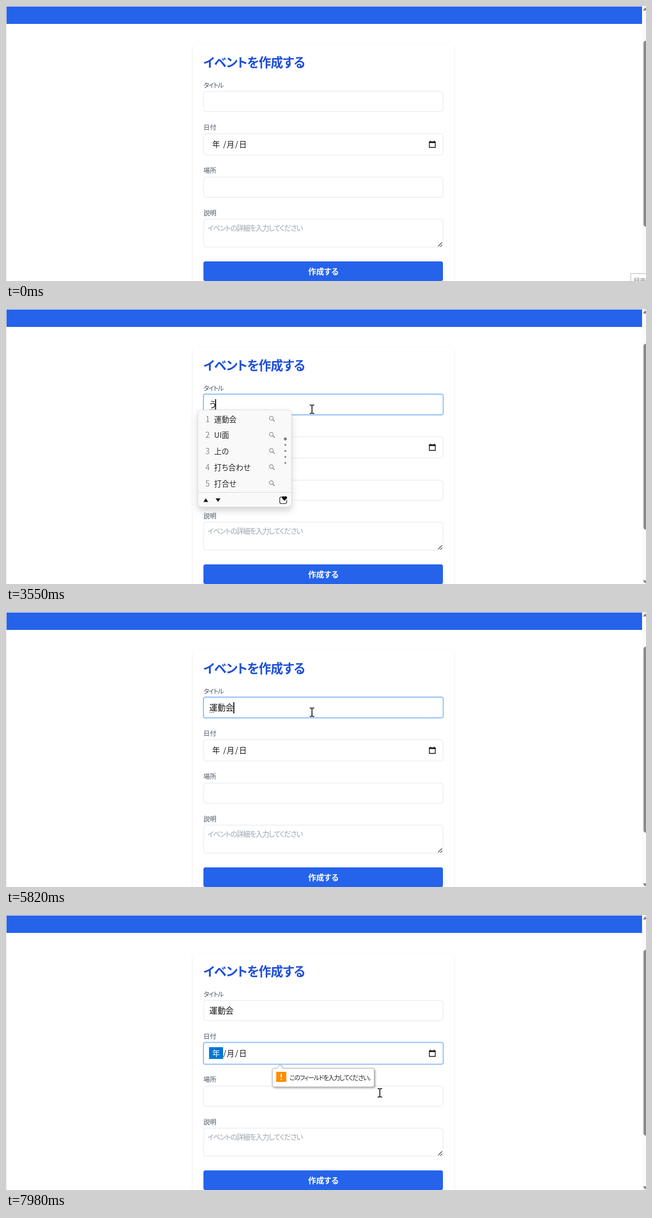
Animation of 1141 by 491 pixels, one loop 8000 ms. Source, as an HTML page:

```html
<!DOCTYPE html>
<html lang="ja">
<head>
<meta charset="utf-8">
<title>イベントを作成する</title>
<style>
  html, body { margin: 0; width: 100%; height: 100%; overflow: hidden; background: #fff; }
  svg { display: block; width: 1141px; height: 491px; }
  text { font-family: "Noto Sans CJK JP", "Noto Sans CJK", "Noto Sans", sans-serif; font-feature-settings: "palt"; white-space: pre; }
  .heading { font-size: 22.2px; font-weight: 700; letter-spacing: -.03em; fill: #1d4ed8; }
  .label { font-size: 11.5px; fill: #4b5563; }
  .kana { letter-spacing: -.1em; }
  .value { font-size: 14.4px; fill: #111; }
  .date { font-size: 13.6px; fill: #111; }
  .placeholder { font-size: 12.8px; letter-spacing: -.09em; fill: #9ca3af; }
  .message { font-size: 11.2px; letter-spacing: -.11em; fill: #222; }
  .field { fill: #fff; stroke: #e5e7eb; stroke-width: 1; }
  .field.focus { stroke: #93c0f5; stroke-width: 2; }
  .card { fill: #fff; filter: drop-shadow(0 2px 2px rgba(0,0,0,.09)); }
  .panel { fill: #f9f9f9; stroke: #dedede; filter: drop-shadow(0 6px 6px rgba(0,0,0,.17)); }
  .bubble { fill: #fff; stroke: #a3a3a3; filter: drop-shadow(2px 2px 1.5px rgba(0,0,0,.28)); }
</style>
</head>
<body>
<svg viewBox="0 0 1141 491">
  <rect width="1141" height="491" fill="#fff"/>
  <rect class="card" x="333" y="68" width="465.5" height="470" rx="7"/>
  <path d="M0.5 0V491M0 .5H1141" stroke="#e3e3e6"/>
  <rect x="1" y="1" width="1133" height="31" fill="#2563eb"/>

  <rect x="1134" y="1" width="7" height="490" fill="#fbfbfb"/>
  <rect x="1136.5" y="62" width="9" height="332" rx="4.5" fill="#8a8a8a"/>
  <path d="M1135.5 8L1139.5 2.5L1143.5 8Z" fill="#808080"/>
  <path id="downArrow" d="M1135.5 484.5L1139.5 490L1143.5 484.5Z" fill="#808080"/>
  <g id="hint">
    <rect x="1113.7" y="477.7" width="40" height="30" fill="#fff" stroke="#c9c9cc" stroke-width="1.4"/>
    <text x="1119" y="494.5" font-size="11" fill="#888">録画</text>
  </g>

  <text class="heading" x="352" y="108.7">イベントを作成する</text>
  <text class="label kana" x="352" y="145.7">タイトル</text>
  <text class="label" x="352" y="221">日付</text>
  <text class="label" x="352" y="298">場所</text>
  <text class="label" x="352" y="374">説明</text>
  <rect class="field" id="titleBox" rx="3.5"/>
  <rect class="field" id="dateBox" rx="3.5"/>
  <rect class="field" x="352.5" y="305.5" width="426.5" height="36" rx="3.5"/>
  <rect class="field" x="352.5" y="380.5" width="426.5" height="50" rx="3.5"/>
  <text class="placeholder" x="359" y="400.5">イベントの詳細を入力してください</text>
  <path d="M770.5 429L777.5 422M774.5 429.5L777.5 426.5" stroke="#444" stroke-width="1.1"/>

  <rect id="yearMark" x="362" y="236" width="25" height="21" fill="#0078d7"/>
  <text class="date" id="year" x="367.7" y="252">年</text>
  <text class="date" x="387.2" y="252">/</text>
  <text class="date" x="393.5" y="252">月</text>
  <text class="date" x="408.5" y="252">/</text>
  <text class="date" x="415.5" y="252">日</text>
  <path d="M756.7 240.5v2M763.3 240.5v2M754.7 242.5h10.6v10h-10.6Z" fill="none" stroke="#111" stroke-width="1.3"/>
  <path d="M754.7 242h10.6v2.6h-10.6Z" fill="#111"/>

  <rect id="button" x="352" y="456" width="427" height="35" rx="3.5"/>
  <text x="565.8" y="478.5" font-size="14.2" font-weight="700" fill="#fff" text-anchor="middle">作成する</text>

  <text class="value" id="typed" x="362.5" y="176"></text>
  <path id="underline" stroke="#222"/>
  <rect id="caret" y="161" width="1.7" height="20" fill="#000"/>

  <g id="popup">
    <rect class="panel" id="panel" x="342" y="180" height="173.5" rx="7"/>
    <path id="divider" stroke="#dcdcdc"/>
    <g id="rows"></g>
    <path d="M352 344.5l4.2-6.5l4.2 6.5ZM373.7 338h8.6l-4.3 6.5Z" fill="#111"/>
    <g id="popupEnd">
      <circle cx="-11" cy="232" r="2.7" fill="#808080"/>
      <g id="dots" fill="#808080"></g>
      <path d="M-14 335.5h-4a3 3 0 0 0-3 3v6a3 3 0 0 0 3 3h6.5a3 3 0 0 0 3-3v-3" fill="none" stroke="#222" stroke-width="1.2"/>
      <path d="M-12.5 342.5l-4-4a2.5 2.5 0 0 1 4-3.2a2.5 2.5 0 0 1 4 3.2Z" fill="#111"/>
    </g>
  </g>

  <g id="tip">
    <path class="bubble" d="M478 273.5h5l5.5-6.500l5.5 6.500H653.5a3 3 0 0 1 3 3v27.500a3 3 0 0 1-3 3H477.5a3 3 0 0 1-3-3v-27.500a3 3 0 0 1 3-3Z"/>
    <rect x="481.7" y="280" width="18" height="18" fill="#ff8c00"/>
    <path d="M490.7 283.5v6.5M490.7 292.5v2.3" stroke="#fff" stroke-width="2.2"/>
    <text class="message" x="505.5" y="294.5">このフィールドを入力してください。</text>
  </g>

  <g id="cursor" stroke-linejoin="round">
    <path id="arrow" d="M.5.5V16.5L4.2 13L6.6 18.5L9 17.5L6.6 12.2H11.5Z" fill="#fff" stroke="#111"/>
    <path id="beam" d="M-4-7.5H-1.5L0-6.5L1.5-7.5H4M0-6.5V6.5M-4 7.5H-1.5L0 6.5L1.5 7.5H4" fill="none" stroke="#000" stroke-width="1.5"/>
    <path id="hand" d="M-1.8 1.3Q0-.8 1.5 1.3V6.2Q3 5.2 4.2 6.7Q6 6 7 7.5Q9.3 7.2 9.3 9.5V13Q9 16 7.5 18H-.5Q-1.5 16-2.5 14.8L-4.5 11.5Q-5.3 9-3.3 9.3L-1.8 10.8Z" fill="#fff" stroke="#111"/>
  </g>
</svg>
<script>
const LOOP = 8000;
const $ = id => document.getElementById(id);
const clamp = v => Math.max(0, Math.min(1, v));
const show = (id, on) => { $(id).style.display = on ? "" : "none"; };
const attrs = (el, values) => { for (const k in values) el.setAttribute(k, values[k]); };
const between = (t, a, b) => t >= a && t < b;
const stepAt = (track, t) => track.reduce((hit, step) => step[0] <= t ? step : hit, track[0]);

// time, text, popup width (0 = closed), suggestions
const typing = [
  [0, "", 0, ""],
  [3350, "う", 0, ""],
  [3480, "う", 167, "運動会 UI面 上の 打ち合わせ 打合せ"],
  [3680, "うn", 167, "運動会 UI面 上の 打ち合わせ 打合せ"],
  [3820, "うn", 161, "運動会 運動 うん 運用 運営"],
  [4350, "うん", 161, "運動会 うん 運用 運営 運転"],
  [4430, "うんd", 161, "運動会 運動 運動中 運動場 運動量"],
  [4520, "うんど", 161, "運動会 運動 運動中 運動場 運動量"],
  [4610, "うんどう", 161, "運動会 運動 運動習慣 運動公園 運動療法"],
  [5140, "うんどう k ", 161, "運動会 運動 運動習慣 運動公園 運動療法"],
  [5210, "うんどうか", 161, "運動会 運動か 運動会場 運動家 運動会の"],
  [5340, "うんどうかい", 186, "運動会 運動会の 運動会場 運動会は 運動会に"],
  [5480, "運動会", 0, ""]
];

// time and hotspot
const mouse = [
  [390, 1006, 365], [460, 915, 270], [530, 805, 160], [600, 690, 94], [670, 600, 108],
  [740, 550, 140], [810, 541, 192], [880, 590, 210], [950, 655, 203], [1020, 691, 195],
  [1550, 551, 191], [1750, 556, 235], [1820, -50, -50], [2010, 545.5, 179],
  [6560, 549, 235], [6630, 556, 358], [6700, 563, 457], [6770, 564, 463],
  [6910, 564, 468], [7050, 565, 472],
  [7640, 575, 461], [7710, 606, 415], [7780, 638, 365], [7850, 658, 332], [7920, 665, 320], [7980, 666.5, 317.5]
];

const rowY = i => 196.5 + i * 28.75;
for (let i = 0; i < 5; i++) {
  const y = rowY(i);
  $("rows").insertAdjacentHTML("beforeend",
    `<text x="355.5" y="${y + 5}" font-size="14" fill="#8a8a8a">${i + 1}</text>
     <text class="word" x="371" y="${y + 5}" font-size="13.4" fill="#222"></text>`);
  $("popupEnd").insertAdjacentHTML("beforeend",
    `<path d="M-33.5 ${y + 1}l3.5 3.5" stroke="#777" stroke-width="1.1"/>
     <circle cx="-36" cy="${y - 1.5}" r="3.5" fill="none" stroke="#777"/>`);
  if (i) $("dots").insertAdjacentHTML("beforeend", `<circle cx="-11" cy="${232 + i * 10.7}" r="1.7"/>`);
}
const words = [...document.querySelectorAll(".word")];

function drawField(id, focused, y, h) {
  const el = $(id);
  el.classList.toggle("focus", focused);
  attrs(el, focused
    ? { x: 352, y: y - .5, width: 427.5, height: h + 1 }
    : { x: 352.5, y, width: 426.5, height: h });
}

function drawTyping(t) {
  const [, text, width, list] = stepAt(typing, t);
  const composing = between(t, 3350, 5480), converted = between(t, 5480, 5820);
  const trace = between(t, 5820, 7240);

  const typed = $("typed");
  typed.classList.toggle("kana", composing);
  if (typed.textContent !== text) typed.textContent = text;
  const end = 362.5 + (text ? typed.getComputedTextLength() : 0);

  $("caret").setAttribute("x", end - .3);
  show("caret", between(t, 1820, 2360) || between(t, 2820, 6350));

  show("underline", composing || converted || trace);
  attrs($("underline"), {
    d: `M363 179.5H${trace ? 372 : end}`,
    "stroke-width": converted ? 2 : 1,
    "stroke-dasharray": converted ? "none" : "1.5 1.5"
  });

  show("popup", width > 0);
  if (!width) return;
  const right = 342 + width;
  $("panel").setAttribute("width", width);
  $("divider").setAttribute("d", `M342.5 327.5H${right - .5}`);
  $("popupEnd").setAttribute("transform", `translate(${right} 0)`);
  list.split(" ").forEach((word, i) => { words[i].textContent = word; });
}

function drawMouse(t) {
  const [, x, y] = stepAt(mouse, t);
  const inside = (top, bottom) => x > 352 && x < 779 && y > top && y < bottom;
  const overButton = inside(456, 491);
  const overText = inside(152, 189) || inside(305, 342) || inside(380, 431);
  show("cursor", t >= mouse[0][0]);
  $("cursor").setAttribute("transform", `translate(${x} ${y})`);
  show("hand", overButton);
  show("beam", overText);
  show("arrow", !overButton && !overText);
}

function drawButton(t) {
  const hover = clamp((t - 6640) / 130) - clamp((t - 7710) / 150);
  const mix = (a, b) => Math.round(a + (b - a) * hover);
  $("button").setAttribute("fill", `rgb(${mix(37, 29)},${mix(99, 78)},${mix(235, 216)})`);
}

function drawTip(t) {
  const p = clamp((t - 7290) / 150);
  const scale = .92 + .08 * p;
  show("tip", p > 0);
  attrs($("tip"), { opacity: p, transform: `translate(566 290) scale(${scale}) translate(-566 -290)` });
}

function update(t) {
  const dateFocus = t >= 7240;
  show("hint", t < 70);
  show("downArrow", t >= 70);
  drawField("titleBox", between(t, 1750, 7240), 152.5, 36);
  drawField("dateBox", dateFocus, 228, 38);
  show("yearMark", dateFocus);
  $("year").style.fill = dateFocus ? "#fff" : "#111";
  drawTyping(t);
  drawButton(t);
  drawTip(t);
  drawMouse(t);
}

const start = performance.now();
function frame(now) {
  update(Math.max(0, now - start) % LOOP);
  requestAnimationFrame(frame);
}
update(0);
requestAnimationFrame(frame);
</script>
</body>
</html>
```
